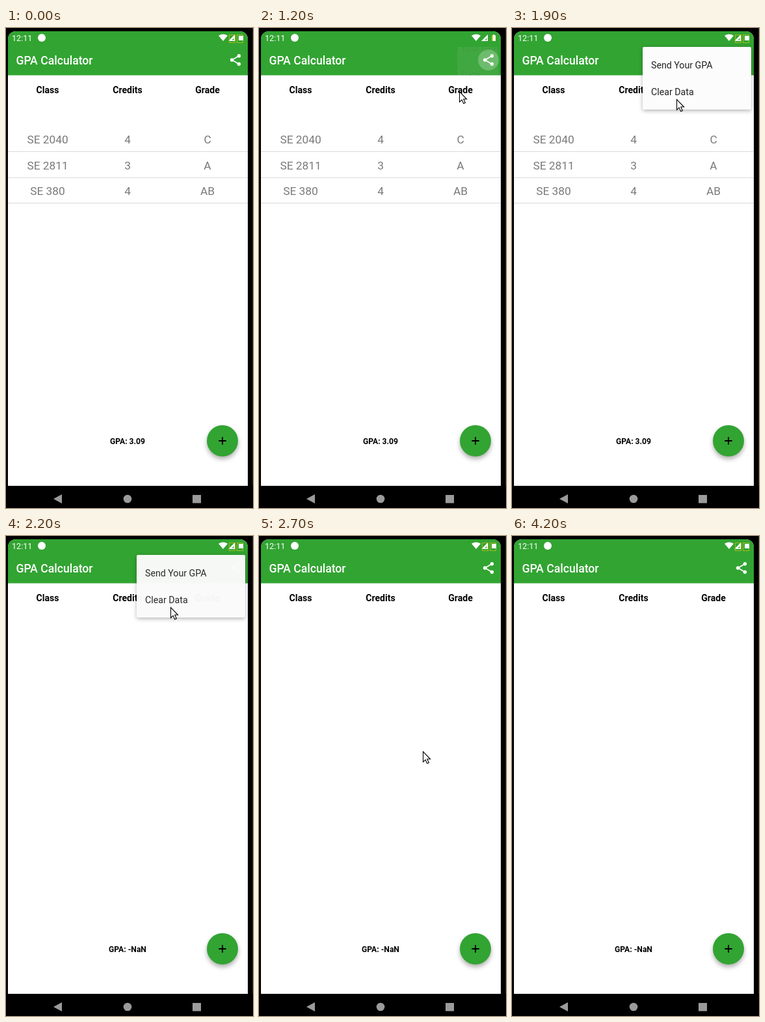
Write an HTML page with a canvas that moves like this. It is 380 by 736 pixels and loops after 4.4 s.

```html
<!DOCTYPE html>
<html lang="en">
<head>
<meta charset="utf-8">
<title>GPA Calculator</title>
<style>
  html, body { margin: 0; width: 100%; height: 100%; overflow: hidden; background: #000; }
  canvas { display: block; }
</style>
</head>
<body>
<canvas id="stage" width="380" height="736"></canvas>
<script>
const ctx = document.getElementById('stage').getContext('2d');
const LOOP = 4400, STEP = 100;
const GREEN = '#32a432';
const COLS = [64, 187, 310];
const ROWS = [['SE 2040', '4', 'C'], ['SE 2811', '3', 'A'], ['SE 380', '4', 'AB']];

// Pointer path: time, x, y
const PATH = [
  [100, 188, 634], [200, 188, 634], [500, 255, 380], [800, 346, 62], [900, 350, 48],
  [1000, 350, 48], [1100, 338, 66], [1200, 308, 97], [1400, 257, 122], [1500, 253, 121],
  [1800, 253, 114], [1900, 253, 109], [2400, 253, 109], [2700, 252, 330], [3000, 250, 588],
  [3300, 250, 573], [3400, 250, 573], [3900, 262, 701]
];

const clamp = v => Math.max(0, Math.min(1, v));
const mix = (a, b, p) => a + (b - a) * p;
const smooth = p => p * p * (3 - 2 * p);

function text(str, x, y, size, color, weight = 400, align = 'left') {
  ctx.font = `${weight} ${size}px Roboto, sans-serif`;
  ctx.textAlign = align;
  ctx.fillStyle = color;
  ctx.fillText(str, x, y);
}

function rect(x, y, w, h, color) {
  ctx.fillStyle = color;
  ctx.fillRect(x, y, w, h);
}

function disc(x, y, r, color) {
  ctx.fillStyle = color;
  ctx.beginPath();
  ctx.arc(x, y, r, 0, Math.PI * 2);
  ctx.fill();
}

function poly(points, color) {
  ctx.fillStyle = color;
  ctx.beginPath();
  points.forEach(([x, y]) => ctx.lineTo(x, y));
  ctx.closePath();
  ctx.fill();
}

function shadow(color, blur, dy) {
  ctx.shadowColor = color;
  ctx.shadowBlur = blur;
  ctx.shadowOffsetY = dy;
}

function drawStatus(charging) {
  text('12:11', 9, 19.5, 12.6, '#fff');
  disc(55, 15, 6, '#fff');

  ctx.fillStyle = '#fff';
  ctx.beginPath();
  ctx.moveTo(334, 20);
  ctx.lineTo(327, 11.8);
  ctx.quadraticCurveTo(334, 7.2, 341, 11.8);
  ctx.fill();

  poly([[342, 20], [352, 10], [352, 20]], '#fff');
  poly([[347.5, 18.5], [350.5, 15.5], [350.5, 18.5]], GREEN);
  if (charging) {
    ctx.strokeStyle = '#a5b91c';
    ctx.lineWidth = 1;
    ctx.strokeRect(343.5, 10.5, 9, 12);
    ctx.strokeRect(355.5, 10.5, 9, 12);
    rect(358, 12, 7, 7, '#fff');
  } else {
    rect(358, 11, 6, 9, '#fff');
    rect(360, 10, 2, 1, '#fff');
    rect(358, 11, 2, 9, '#c5c52a');
  }
}

function drawShare() {
  const at = (x, y) => [342.2 + x * 0.9, 38.2 + y * 0.9];
  const nodes = [at(18, 5), at(6, 12), at(18, 19)];
  ctx.strokeStyle = '#fff';
  ctx.lineWidth = 1.8;
  ctx.beginPath();
  nodes.forEach(([x, y]) => ctx.lineTo(x, y));
  ctx.stroke();
  nodes.forEach(([x, y]) => disc(x, y, 2.7, '#fff'));
}

function drawRipple(t) {
  if (t < 1000 || t >= 1500) return;
  disc(353, 49, mix(8, 16, clamp((t - 1000) / 100)), 'rgba(255,255,255,.24)');
}

function drawTable(filled) {
  ['Class', 'Credits', 'Grade'].forEach((s, i) => text(s, COLS[i], 100, 14, '#000', 700, 'center'));
  if (filled) {
    ROWS.forEach((row, r) => {
      const y = 176.7 + r * 39.8;
      row.forEach((s, i) => text(s, COLS[i], y, 17.3, '#7a7a7a', 400, 'center'));
      rect(3, 189 + r * 40 - (r > 1), 369, 1, '#dadada');
    });
  }
  text(filled ? 'GPA: 3.09' : 'GPA: -NaN', 187, 638.4, 12.1, '#000', 700, 'center');
}

function drawButton() {
  ctx.save();
  shadow('rgba(0,0,0,.32)', 7, 4);
  disc(333, 633, 24, GREEN);
  ctx.restore();
  rect(327.3, 632, 11.4, 2, '#000');
  rect(332, 627.3, 2, 11.4, '#000');
}

function drawNav() {
  const gray = '#9b9b9b';
  rect(0, 702, 380, 34, '#000');
  poly([[73, 722], [86, 715], [86, 729]], gray);
  disc(187, 722, 6.3, gray);
  rect(287, 716, 13, 12.5, gray);
}

// The menu slides and unclips from the share icon, then later fades out
function drawMenu(t) {
  if (t < 1200 || t >= 2500) return;
  const p = smooth(clamp((t - 1180) / 230));
  const left = mix(307, 201, p), bottom = mix(72, 125, p);
  const w = 368 - left, h = bottom - 29;

  ctx.save();
  ctx.globalAlpha = clamp((t - 1192) / 100) * (1 - clamp((t - 2193) / 225));
  ctx.save();
  shadow('rgba(0,0,0,.3)', 6, 2);
  ctx.fillStyle = '#fcfcfc';
  ctx.beginPath();
  ctx.roundRect(left, 29, w, h, 2);
  ctx.fill();
  ctx.restore();
  ctx.beginPath();
  ctx.rect(left, 29, w, h);
  ctx.clip();
  ctx.translate(62 * (1 - p), -27 * (1 - p));
  text('Send Your GPA', 214, 62, 14.2, '#212121');
  text('Clear Data', 214, 103, 14.2, '#212121');
  ctx.restore();
}

function drawPointer(t) {
  if (t < PATH[0][0] || t > PATH[PATH.length - 1][0]) return;
  const i = Math.max(1, PATH.findIndex(k => k[0] >= t));
  const a = PATH[i - 1], b = PATH[i];
  const p = (t - a[0]) / (b[0] - a[0]);
  ctx.save();
  ctx.translate(Math.round(mix(a[1], b[1], p)) + 0.5, Math.round(mix(a[2], b[2], p)) + 0.5);
  poly([[0, 0], [0, 16], [3.6, 12.6], [6.2, 18.3], [8.8, 17.2], [6.3, 11.5], [11, 11.5]], '#fff');
  ctx.strokeStyle = '#000';
  ctx.lineWidth = 1.1;
  ctx.stroke();
  ctx.restore();
}

function draw(t) {
  rect(0, 0, 380, 736, '#000');
  rect(379, 0, 1, 736, '#202020');

  ctx.save();
  ctx.beginPath();
  ctx.roundRect(3, 5, 369, 697, [12, 12, 0, 0]);
  ctx.clip();
  rect(3, 5, 369, 697, '#fff');
  rect(3, 5, 369, 67.5, GREEN);
  drawStatus(t < 100 || t >= 1900);
  text('GPA Calculator', 15.4, 55.6, 17.6, '#fff', 500);
  drawRipple(t);
  drawShare();
  drawTable(t < 2100);
  drawButton();
  drawMenu(t);
  ctx.restore();

  drawNav();
  drawPointer(t);
}

const start = performance.now();
function tick() {
  const t = (performance.now() - start) % LOOP;
  draw(Math.floor(t / STEP) * STEP);
  requestAnimationFrame(tick);
}
tick();
</script>
</body>
</html>
```
